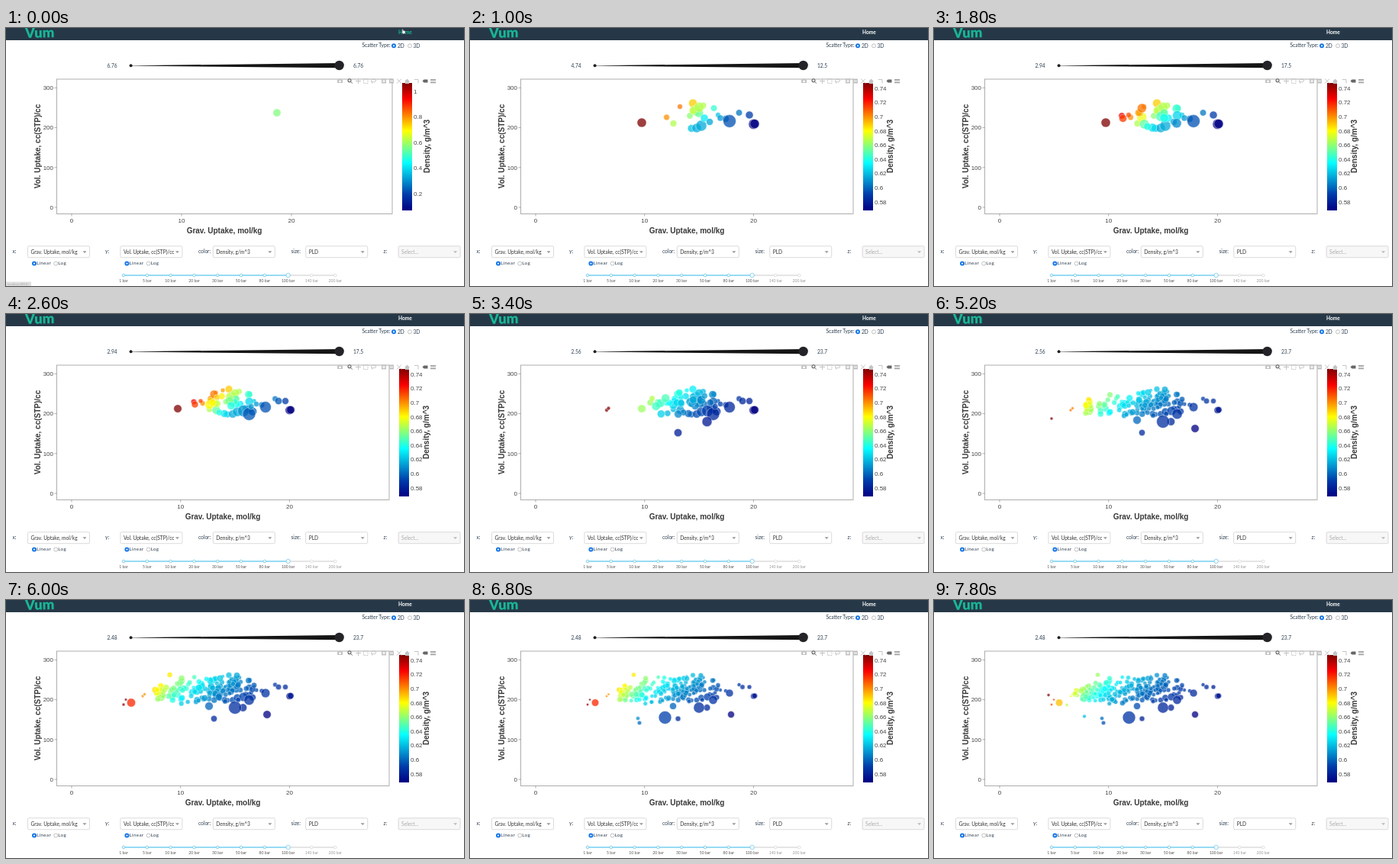
Recreate the animation shown at these times as an HTML page. Size 600 by 338 pixels, loop 8000 ms.

```html
<!DOCTYPE html>
<html lang="en">
<head>
<meta charset="utf-8">
<title>Scatter explorer</title>
<style>
  html, body { margin: 0; width: 100%; height: 100%; overflow: hidden; background: #fff; }
  svg { display: block; width: 100vw; height: 100vh; }
  text { font-family: Lato, sans-serif; font-size: 6.6px; fill: #2c3e50; }
  .axis text { font-family: "Liberation Sans", Arial, sans-serif; font-size: 8px; fill: #444; }
  .axis .title { font-size: 10px; font-weight: bold; fill: #383838; text-anchor: middle; }
</style>
</head>
<body>
<svg id="stage" viewBox="0 0 600 338"></svg>
<script>
const STEP_MS = 200, STEPS = 40;
const ORIGIN_X = 86, ORIGIN_Y = 235, MAX_RADIUS = 8.5;
const TEAL = '#18b697', BLUE = '#1677e8', NAVY = '#263847';

// Points arrive in waves; each wave covers a range of steps.
const waves = [[1, 5], [6, 13], [14, 21], [22, 26], [27, 34], [35, 39]];
const outliers = [ // [x, y, size] per wave
  [[352.5, 111, 2.5], [225, 124, 3.6], [257.5, 117, 2.3], [275, 103, 2], [266.5, 125, 2.6],
   [292, 98.5, 3.3], [296, 108, 4.2], [288, 115, 2.5], [297, 131, 3.6], [303, 128, 4.2],
   [307, 118, 3], [319.5, 105, 2.5], [314, 123, 2.7], [325, 114, 2], [328, 118, 2.4],
   [335, 119, 2.6], [340, 122, 5], [366, 114, 3], [371.5, 126, 3.9], [373, 125.5, 3.6]],
  [[246, 115, 2.5], [247.5, 118.5, 3], [255, 114, 2], [268, 111, 2.8], [284, 100, 2],
   [311, 127, 5], [318.5, 131, 5.7], [357, 114, 3.2]],
  [[179, 126, 1.6], [181.5, 123.5, 1.6], [272.5, 155.5, 3.5], [310.5, 141, 4.4],
   [342, 150, 4.5], [204, 115, 3.6], [203, 122, 4.8], [203, 127, 4.8]],
  [[154, 137, 1.7], [266, 139, 4.6], [300, 141, 7.2]],
  [[157, 130.5, 1.5], [164, 134.5, 4.8], [214.5, 98, 3], [220, 155, 2.6],
   [222, 161, 2.8], [255.5, 154, 8.5]],
  [[150, 124.5, 2], [174, 137.5, 2], [197, 152.5, 2.4]]
];
const clouds = [ // [wave, count, left, right]
  [0, 5, 290, 312], [1, 24, 266, 324], [2, 38, 225, 325], [3, 14, 198, 209],
  [3, 32, 214, 302], [4, 64, 194, 285], [5, 50, 179, 250]
];

let seed = 29;
function random() {
  seed = (seed * 16807) % 2147483647;
  return seed / 2147483647;
}

const points = [];
function addWave(wave, list) {
  const [first, last] = waves[wave];
  list.forEach(([x, y, size], i) => {
    const birth = first + Math.floor(i / list.length * (last - first + 1));
    points.push({ x, y, size, birth, density: (ORIGIN_Y - y) / (x - ORIGIN_X) });
  });
}
function cloudPoint(left, right) {
  const x = left + (right - left) * random();
  const spread = Math.max(5, Math.min(20, (x - 165) * 0.3));
  const y = 123 - Math.min(6, Math.max(0, (x - 190) * 0.08)) + (random() + random() - 1) * spread;
  return [x, y, 2.5 + 1.4 * random()];
}
outliers.forEach((list, wave) => addWave(wave, list));
clouds.forEach(([wave, count, left, right]) =>
  addWave(wave, Array.from({ length: count }, () => cloudPoint(left, right))));
points[0].birth = 0;
points.sort((a, b) => a.birth - b.birth);

const jet = [[0, [0, 0, 131]], [.125, [0, 60, 170]], [.375, [5, 255, 255]],
             [.625, [255, 255, 0]], [.875, [250, 0, 0]], [1, [128, 0, 0]]];
function jetColor(t) {
  const i = Math.max(1, jet.findIndex(stop => stop[0] >= t));
  const [t0, a] = jet[i - 1], [t1, b] = jet[i];
  return `rgb(${a.map((v, k) => Math.round(v + (b[k] - v) * (t - t0) / (t1 - t0)))})`;
}

const text = (x, y, s, attrs = '') => `<text x="${x}" y="${y}" ${attrs}>${s}</text>`;
const rect = (x, y, w, h, attrs) => `<rect x="${x}" y="${y}" width="${w}" height="${h}" ${attrs}/>`;
const circle = (x, y, r, attrs = '') => `<circle cx="${x}" cy="${y}" r="${r}" ${attrs}/>`;
const path = (d, attrs) => `<path d="${d}" ${attrs}/>`;
const upright = (x, y, s) => text(0, 0, s, `class="title" transform="translate(${x} ${y}) rotate(-90)"`);
const radio = (x, y, on) => on
  ? circle(x, y, 3, `fill="${BLUE}"`) + circle(x, y, 1.1, 'fill="#fff"')
  : circle(x, y, 2.5, 'fill="#fff" stroke="#999" stroke-width=".6"');

function header(first) {
  const cursor = 'M519 1.2l1 0 .5 2 2.5 .6v2.4l-1 1.5h-2l-1.6-2.6 .8-.4z';
  return rect(0, 0, 600, 16, `fill="${NAVY}"`) +
    text(25, 13, 'Vum', `style="font-size:18.5px;font-weight:900;fill:${TEAL}" transform="rotate(-1 25 13)"`) +
    text(514, 8.2, 'Home', `style="font-weight:bold;fill:${first ? TEAL : '#fff'}"`) +
    (first ? path(cursor, 'fill="#fff" stroke="#222" stroke-width=".4"') : '') +
    text(466.5, 25, 'Scatter Type:') + radio(508, 23.3, true) + text(513, 25.6, '2D') +
    radio(529, 23.3) + text(533.5, 25.6, '3D');
}

function sizeLegend(step) {
  const low = step < 1 ? '6.76' : step < 6 ? '4.74' : step < 14 ? '2.94' : step < 27 ? '2.56' : '2.48';
  const high = step < 1 ? '6.76' : step < 6 ? '12.5' : step < 14 ? '17.5' : '23.7';
  return text(132.5, 51.7, low) + text(455, 51.7, high) +
    path('M163 49.2L436 46v6.2L163 49.5z', 'fill="#151515"') +
    circle(163.6, 49.2, 2, 'fill="#222"') + circle(436.6, 49, 6.2, 'fill="#242428"');
}

function modebar() {
  const line = (d, color = '#c4c4c4') => path(d, `fill="none" stroke="${color}" stroke-width="1"`);
  const block = (x, y, w, h, color = '#c4c4c4') => rect(x, y, w, h, `fill="${color}"`);
  return block(434, 67.5, 7, 4.5) + circle(437.5, 69.8, 1.4, 'fill="#fff"') + block(436, 66.7, 3, 1) +
    circle(450, 68.7, 2, 'fill="none" stroke="#666" stroke-width="1.1"') + line('M451.5 70.3l2.3 2.3', '#666') +
    line('M458 69.5h7M461.5 66v7') + line('M468.5 66.5h5.5v6h-5.5z').replace('/>', ' stroke-dasharray="1 .6"/>') +
    line('M479 71c-2-5 6-5 5.500-2c0 2-3 2-5 1.500v2') +
    block(492, 66.5, 6, 6) + line('M493 69.5h4M495 67.500v4', '#fff') +
    block(502, 66.5, 6, 6) + line('M503 69.5h4', '#fff') +
    line('M512 66.500l6 6m0-6l-6 6') + path('M522 70l3.500-3.500 3.500 3.500h-1v3h-5v-3z', 'fill="#c4c4c4"') +
    line('M535 67.500h5v5') + path('M545.5 69.500l2-2h5v4h-5z', 'fill="#666"') +
    block(556, 67, 7, 2, '#aaa') + block(556, 70.3, 7, 2, '#aaa');
}

function plot(step) {
  const first = step === 0, right = first ? 506 : 502, unit = first ? 14.4 : 14.27;
  let s = rect(66.5, 67, right - 66.5, 176.5, 'fill="#fff" stroke="#999" stroke-width=".8"');
  for (let v = 0; v <= 300; v += 100) {
    const y = ORIGIN_Y - v * .522;
    s += path(`M63.5 ${y}h3`, 'stroke="#888" stroke-width=".7"') + text(62, y + 2.8, v, 'text-anchor="end"');
  }
  for (let v = 0; v <= 20; v += 10) {
    const x = ORIGIN_X + v * unit;
    s += path(`M${x} 243.500v3`, 'stroke="#888" stroke-width=".7"') + text(x, 255, v, 'text-anchor="middle"');
  }
  s += text(first ? 286 : 284, 268.7, 'Grav. Uptake, mol/kg', 'class="title"') +
    upright(45, 155, 'Vol. Uptake, cc(STP)/cc');

  const shown = points.filter(p => p.birth <= step);
  const densities = shown.map(p => p.density);
  const low = Math.min(...densities), range = Math.max(...densities) - low;
  const largest = Math.max(...shown.map(p => p.size));
  for (const p of shown) {
    const x = ORIGIN_X + (p.x - ORIGIN_X) * unit / 14.27;
    const r = first ? 5.2 : MAX_RADIUS * p.size / largest;
    const color = jetColor(range ? (p.density - low) / range : .5);
    s += circle(x, p.y, r, `fill="${color}" stroke="#fff" stroke-width=".5" opacity=".75"`);
  }

  const barX = first ? 519 : 515;
  s += rect(barX, 72, 13, 167, 'fill="url(#jet)"');
  const ticks = first ? 5 : 9;
  for (let i = 0; i < ticks; i++) {
    const label = first ? 1 - i * .2 : .74 - i * .02;
    const y = first ? 82.7 + i * 33.5 : 79 + i * 18.6;
    s += text(barX + 15, y + 2.8, +label.toFixed(2));
  }
  return `<g class="axis">${s}${upright(first ? 554.5 : 554, 155, 'Density, g/m^3')}</g>`;
}

function controls() {
  const fields = [['x:', 'Grav. Uptake, mol/kg'], ['y:', 'Vol. Uptake, cc(STP)/cc'],
                  ['color:', 'Density, g/m^3'], ['size:', 'PLD'], ['z:', 'Select...']];
  let s = '';
  fields.forEach(([name, value], i) => {
    const x = 28.5 + i * 121.4, off = i === 4;
    const labelX = [8.5, 130, 252, 373.5, 494.5][i];
    s += text(labelX, 294.8, name) +
      rect(x, 285.7, 81, 15, `rx="1.5" fill="${off ? '#f7f7f7' : '#fff'}" stroke="#ccc" stroke-width=".7"`) +
      text(x + 4, 295.6, value, off ? 'style="fill:#aaa"' : 'style="fill:#333"') +
      path(`M${x + 72} 292.300h5l-2.500 2.600z`, `fill="${off ? '#bbb' : '#999'}"`);
    if (i < 2) {
      const spaced = 'style="font-size:6.2px;letter-spacing:.35px"';
      s += radio(x + 8.5, 308.5, true) + text(x + 11.7, 310.4, 'Linear', spaced) +
        radio(x + 36.7, 308.5) + text(x + 39.8, 310.4, 'Log', spaced);
    }
  });
  s += rect(154, 323, 277, 2, 'fill="#e5e5e5"') + rect(154, 323, 215.5, 2, 'fill="#96dbf5"');
  [1, 5, 10, 20, 30, 50, 80, 100, 140, 200].forEach((bar, i) => {
    const x = 154 + i * 30.8, active = i < 8;
    s += circle(x, 324, i === 7 ? 2.7 : 1.8, `fill="#fff" stroke="${active ? '#75cdec' : '#ddd'}" stroke-width=".9"`) +
      text(x, 333.4, bar + ' bar', `text-anchor="middle" style="font-size:5.1px;fill:${active ? '#555' : '#999'}"`);
  });
  return s;
}

const gradient = '<defs><linearGradient id="jet" x1="0" y1="1" x2="0" y2="0">' +
  jet.map(([t, c]) => `<stop offset="${t}" stop-color="rgb(${c})"/>`).join('') + '</linearGradient></defs>';
const statusBar = rect(0, 332.5, 33, 5.5, 'fill="#dfdfdf"') +
  text(2, 337, 'localhost:8050/', 'style="font-size:4px;fill:#aaa"');

const stage = document.getElementById('stage');
let drawn = -1;
function draw() {
  const step = Math.floor(performance.now() / STEP_MS) % STEPS;
  if (step !== drawn) {
    drawn = step;
    stage.innerHTML = gradient + header(step === 0) + sizeLegend(step) + plot(step) +
      modebar() + controls() + (step === 0 ? statusBar : '');
  }
  requestAnimationFrame(draw);
}
draw();
</script>
</body>
</html>
```
